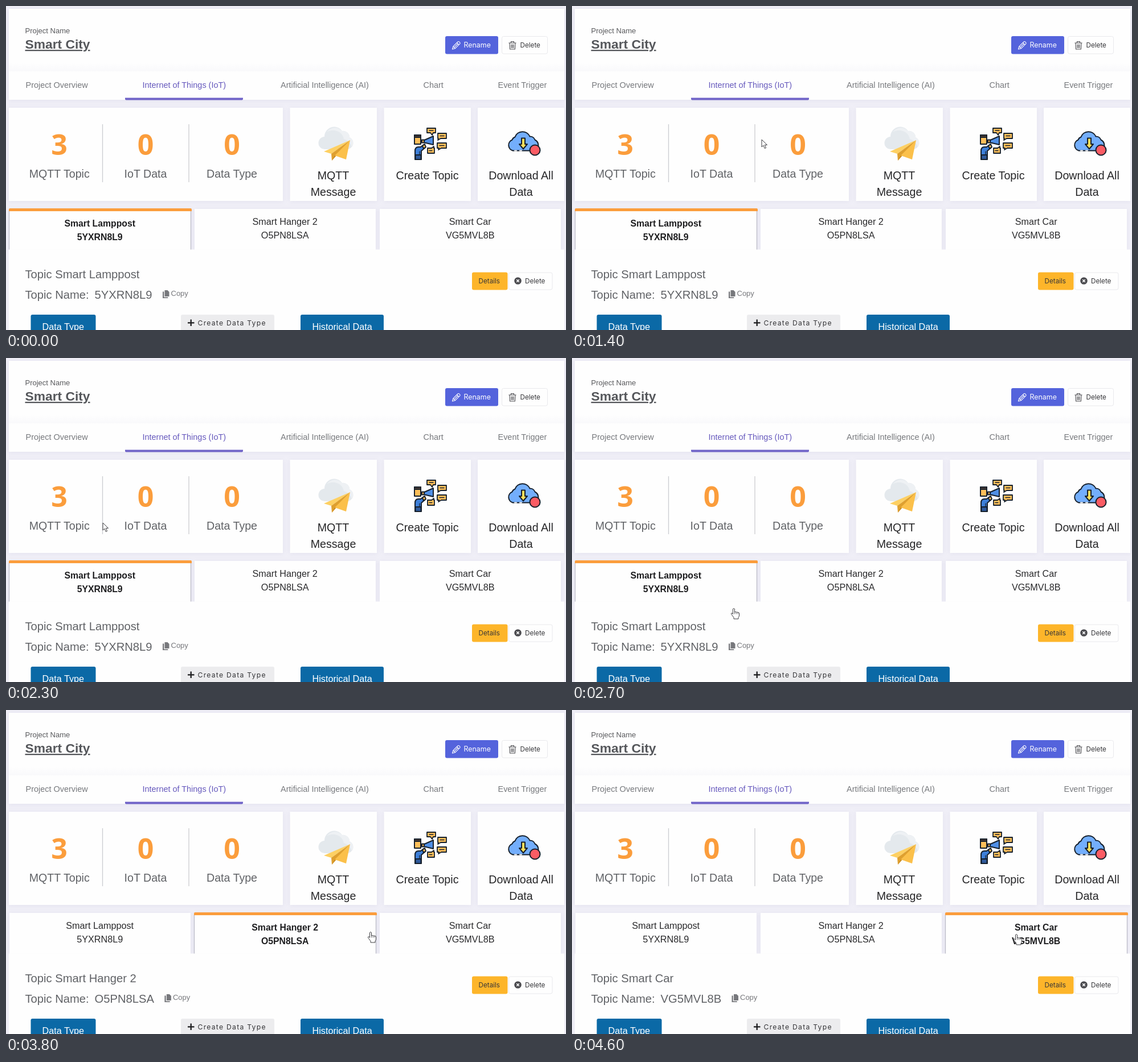
Write an HTML page that moves like this. It is 983 px wide and 570 px high and loops after 4800 ms.

```html
<!DOCTYPE html>
<html lang="en">
<head>
<meta charset="utf-8">
<title>IoT dashboard</title>
<style>
  html, body { margin: 0; width: 100%; height: 100%; overflow: hidden; background: #f0eff7; }
  svg { display: block; width: 983px; height: 570px; font-family: "Liberation Sans", Arial, sans-serif; }
  text { white-space: pre; }
  .mid { text-anchor: middle; }
  .card { fill: #fefefe; filter: drop-shadow(0 1px 4px rgba(90, 85, 140, .09)); }
  .nav { font-size: 14.45px; fill: #77797d; }
  .num { font: 700 50px "Open Sans", "Noto Sans", sans-serif; fill: #fb9d3c; }
  .label { font-size: 19.6px; fill: #606266; }
  .action { font-size: 19.65px; fill: #262628; }
  .btn { font-family: Inter, sans-serif; font-size: 11.7px; fill: #353538; }
  .tab { font-size: 16.2px; fill: #29292b; }
  .tab.on { font-size: 15.8px; font-weight: 700; fill: #1e1e20; }
  .topic { font-size: 20.2px; fill: #606266; }
  .blue { font-size: 16.2px; fill: #fff; }
  .ink { stroke: #16202c; stroke-width: 2; stroke-linejoin: round; stroke-linecap: round; }
  .edge { fill: #fefefe; stroke: #e9e9ec; }
</style>
</head>
<body>
<svg viewBox="0 0 983 570">
  <defs>
    <linearGradient id="fade" x2="0" y2="1">
      <stop offset="0" stop-color="#fefefe"/>
      <stop offset="1" stop-color="#f9f9fb"/>
    </linearGradient>
  </defs>
  <rect width="983" height="570" fill="#f0eff7"/>

  <!-- header -->
  <rect class="card" x="5" y="5" width="975" height="160"/>
  <rect x="5" y="100" width="975" height="15" fill="url(#fade)"/>
  <text x="33.5" y="48" font-size="13" fill="#58595c">Project Name</text>
  <text x="33.5" y="75" font-size="22.8" font-weight="700" fill="#55575b" text-decoration="underline">Smart City</text>
  <rect x="771" y="53" width="93" height="31.5" rx="3" fill="#5463dc"/>
  <g fill="none" stroke="#fff" stroke-width="1.1" stroke-linejoin="round">
    <path d="M783.5 76l1.4-4.8 8.2-8.2q1.3-1 2.6.2l.9.9q1.1 1.3 0 2.5l-8.3 8.2zM791.5 64.6l3.4 3.5M785 71.2l3.3 3.4M786.8 72.9l6.4-6.4"/>
  </g>
  <text class="btn" x="803.5" y="73" style="font-size:12.4px;fill:#fff">Rename</text>
  <rect class="edge" x="870.5" y="53.5" width="80" height="30.5" rx="3"/>
  <g fill="none" stroke="#4c4c50" stroke-width="1.1">
    <path d="M882.5 65h13M886.5 64.5v-2h5v2M884 65.5l.6 10.5h8.8l.6-10.5M887 67.5v6.5M889 67.5v6.5M891 67.5v6.5"/>
  </g>
  <text class="btn" x="902.5" y="73">Delete</text>

  <text class="nav" x="34.5" y="144">Project Overview</text>
  <text class="nav" x="239.5" y="144" style="fill:#6659bd">Internet of Things (IoT)</text>
  <text class="nav" x="482" y="144">Artificial Intelligence (AI)</text>
  <text class="nav" x="732.5" y="144">Chart</text>
  <text class="nav" x="863.5" y="144">Event Trigger</text>
  <path d="M209 161.5h207v2q0 2-2 2H211q-2 0-2-2z" fill="#7064c8"/>

  <!-- counters -->
  <rect class="card" x="5" y="179" width="481" height="164"/>
  <path d="M169.5 208v102M321 208v102" stroke="#cbccd0" stroke-width="1.3"/>
  <g class="mid">
    <text class="num" x="93.5" y="261.5">3</text>
    <text class="num" x="245" y="261.5">0</text>
    <text class="num" x="396.5" y="261.5">0</text>
    <text class="label" x="93.8" y="302">MQTT Topic</text>
    <text class="label" x="245" y="302">IoT Data</text>
    <text class="label" x="396.5" y="302">Data Type</text>
  </g>

  <!-- action cards -->
  <rect class="card" x="498.5" y="179" width="152.5" height="164"/>
  <rect class="card" x="663.5" y="179" width="152.5" height="164"/>
  <rect class="card" x="828" y="179" width="152" height="164"/>
  <g class="mid action">
    <text x="574.5" y="304.5">MQTT</text>
    <text x="574.5" y="333.5">Message</text>
    <text x="739.5" y="304.5">Create Topic</text>
    <text x="904" y="304.5">Download All</text>
    <text x="904" y="333.5">Data</text>
  </g>

  <!-- paper plane and cloud -->
  <path d="M560 252a11 11 0 0 1-1-22a17 17 0 0 1 31-10a11 11 0 0 1 13 11a11 11 0 0 1-4 21z" fill="#e4e9ed"/>
  <path d="M563 222a17 17 0 0 1 27-2a11 11 0 0 1 13 11a11 11 0 0 1 4 17q-3-11-14-14q-3-13-16-15q-8-1-14 3z" fill="#eef1f4"/>
  <path d="M604 236l-46 20 13 4z" fill="#fdd063"/>
  <path d="M604 236l-33 24 1 12z" fill="#dfa02f"/>
  <path d="M604 236l-27 27-5 9 6-7z" fill="#c98b22"/>
  <path d="M604 236l-27 27 20 7z" fill="#fbc04a"/>

  <!-- person with megaphone -->
  <g class="ink">
    <path d="M718 270v-15q0-7 6-7h4l5-4 3 5-7 6v15z" fill="#3d7fd9"/>
    <path d="M718.5 262h10v8h-10z" fill="#2f5a9b"/>
    <path d="M717 227h11v16h-11z" fill="#fdbf5a"/>
    <path d="M717 231v-4h11v4z" fill="#4a3a33"/>
    <path d="M733 236.5l17-7.5v15l-17-4z" fill="#4f8fe6"/>
    <path d="M730 235.5h4v5h-4zM731 246l4-3 2 5-4 3z" fill="#fdbf5a"/>
    <g fill="#fdbf5a" stroke-width="1.8">
      <path d="M739 215h15v8h-4l-2 4-3-4h-6z"/>
      <path d="M758 224h15v9h-10l-5 3 1-3h-1z"/>
      <path d="M757 241h16v9h-9l-5 3 1-3h-3z"/>
      <path d="M740 250h7l4-3v3h1v9h-12z"/>
    </g>
    <path d="M743 219h7M762 228.5h7M761 245.5h8M743 254.5h5M726 262v-6" fill="none" stroke-width="1.3"/>
  </g>

  <!-- cloud download -->
  <g class="ink">
    <path d="M890 254.500a10 10 0 0 1-1.500-19a8 8 0 0 1 5-5a14 14 0 0 1 26-1a9 9 0 0 1 9 6a11 11 0 0 1 1 19z" fill="#73aefc"/>
    <path d="M905 232.500h6v10.500h4l-7 8.500-7-8.500h4z" fill="#ffe05c"/>
    <path d="M893 254.500h3M902 254.500h3" stroke="#fefefe" fill="none"/>
    <circle cx="928.500" cy="253.500" r="9" fill="#fb5c64"/>
  </g>

  <g id="tabs"></g>

  <!-- topic panel -->
  <rect x="5" y="428.500" width="975" height="142" fill="#fefefe"/>
  <text class="topic" id="title" x="33.500" y="479"></text>
  <text class="topic" x="33.500" y="514.500">Topic Name:</text>
  <text class="topic" id="code" x="155.500" y="514.500"></text>
  <g id="copy" fill="#77787c">
    <path d="M278.500 500h5l3 3v8h-8z"/>
    <path d="M275 502.500h2.300v9.700h7v1.800H275z"/>
    <text x="289.500" y="510" font-size="13">Copy</text>
  </g>
  <rect x="818" y="468.500" width="62.500" height="31" rx="3" fill="#fdb52a"/>
  <text class="btn" x="829.500" y="488">Details</text>
  <rect class="edge" x="882.500" y="469" width="76.500" height="30" rx="3"/>
  <circle cx="898.500" cy="483.500" r="6.300" fill="#4c4c50"/>
  <path d="M896.300 481.300l4.400 4.400M900.700 481.300l-4.400 4.400" stroke="#fff" stroke-width="1.600"/>
  <text class="btn" x="911" y="488">Delete</text>

  <rect x="43.500" y="543" width="114" height="40" rx="3" fill="#0b69a6"/>
  <text class="blue" x="63.500" y="570">Data Type</text>
  <rect x="307" y="543" width="164" height="40" rx="3" fill="#ececee"/>
  <path d="M319 557.300h11.500M324.700 551.500v11.500" stroke="#1d1d1f" stroke-width="2.300"/>
  <text class="btn" x="336.500" y="562" style="font-size:12.200px;letter-spacing:1.250px">Create Data Type</text>
  <rect x="517" y="543" width="146" height="40" rx="3" fill="#0b69a6"/>
  <text class="blue" x="537.500" y="570">Historical Data</text>

  <!-- pointer, tip at the origin -->
  <g id="pointer" fill="#fff" stroke="#3c3c40" stroke-linejoin="round" visibility="hidden">
    <path id="arrow" d="M0 0v13l3-2.700 2.300 5.300 2.200-1-2.200-5.200h4.200z"/>
    <g id="hand">
      <path d="M-1.500 1.500q1.500-2 3 0v5.500q1.500-1.200 2.800.2q1.500-1 2.700.5q2-.7 2.500 1.300v4q0 2-1.500 3.500v2.500h-8v-2.500l-4.500-6q-.5-2 1.500-1.700l1.500 1.700z"/>
      <path d="M1.500 7v3.500M4.300 7.500v3M7 8v2.500" fill="none" stroke-width=".8"/>
    </g>
  </g>
</svg>
<script>
  const LOOP = 4800, TICK = 100;
  const HOLDS = [3, 9, 16, 22, 28, 35, 41, 47]; // ticks that repeat the picture before
  const HAND_AT = 2500;
  const topics = [
    { name: 'Smart Lamppost', code: '5YXRN8L9', from: 0, shift: 0 },
    { name: 'Smart Hanger 2', code: 'O5PN8LSA', from: 3200, shift: 3.4 },
    { name: 'Smart Car', code: 'VG5MVL8B', from: 4500, shift: 5.5 }
  ];
  // time, x, y
  const path = [
    [800, 945, 560], [1000, 760, 500], [1200, 510, 352], [1400, 333, 235],
    [1500, 220, 180], [1700, 75, 112], [1900, 66, 108], [2100, 100, 150],
    [2300, 170, 290], [2500, 240, 400], [2700, 284, 440], [2900, 360, 432],
    [3100, 476, 400], [3300, 480, 398], [3500, 483, 398], [3800, 640, 390],
    [4000, 800, 376], [4200, 842, 372], [4400, 787, 390], [4600, 780, 394]
  ];
  const $ = id => document.getElementById(id);
  const show = (el, on) => el.setAttribute('visibility', on ? 'visible' : 'hidden');
  let shown = -1;

  function tab(topic, i, on) {
    const x = 6 + i * 325, mid = x + 158.7, y = on ? 388 : 384.5;
    const frame = on
      ? `<path d="M${x - .5} 360v69M${x + 318.5} 360v69" stroke="#bcbcc8" stroke-width="1.3"/>
         <path d="M${x - 1} 361v-3q0-2 2-2h317q2 0 2 2v3z" fill="#fb9d3c"/>`
      : '';
    return `<rect class="card" x="${x}" y="357" width="318" height="72"/>${frame}
      <g class="mid tab ${on ? 'on' : ''}">
        <text x="${mid}" y="${y}">${topic.name}</text>
        <text x="${mid}" y="${y + 24}">${topic.code}</text>
      </g>`;
  }

  function select(i) {
    if (i === shown) return;
    shown = i;
    const topic = topics[i];
    $('tabs').innerHTML = topics.map((t, n) => tab(t, n, n === i)).join('');
    $('title').textContent = 'Topic ' + topic.name;
    $('code').textContent = topic.code;
    $('copy').setAttribute('transform', `translate(${topic.shift} 0)`);
  }

  function pointAt(t) {
    const n = path.findIndex(p => p[0] > t);
    if (n < 0) return path[path.length - 1].slice(1);
    const [t0, x0, y0] = path[n - 1], [t1, x1, y1] = path[n];
    const k = (t - t0) / (t1 - t0);
    return [x0 + (x1 - x0) * k, y0 + (y1 - y0) * k];
  }

  function render() {
    let tick = Math.floor(performance.now() % LOOP / TICK);
    if (HOLDS.includes(tick)) tick--;
    const t = tick * TICK;
    select(topics.filter(p => p.from <= t).length - 1);

    const visible = t >= path[0][0], hand = t >= HAND_AT;
    show($('pointer'), visible);
    show($('arrow'), visible && !hand);
    show($('hand'), visible && hand);
    if (visible) $('pointer').setAttribute('transform', `translate(${pointAt(t).join(' ')})`);
    requestAnimationFrame(render);
  }
  render();
</script>
</body>
</html>
```
